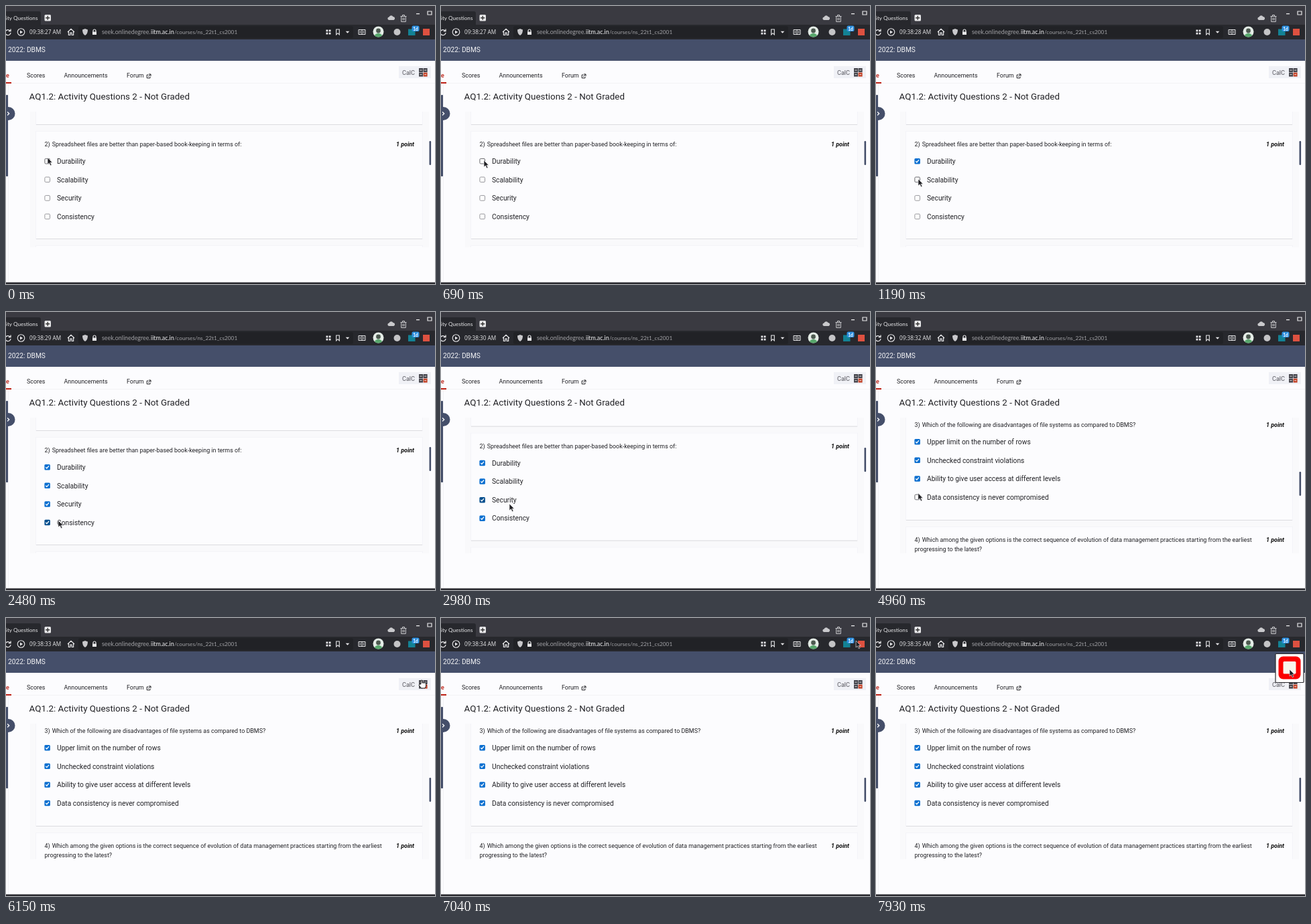
These frames come from a looping animation (640x416 px, 8 s). An HTML page with a canvas:

```html
<!DOCTYPE html>
<html lang="en">
<head>
<meta charset="utf-8">
<title>Activity questions</title>
<style>
html, body { margin: 0; width: 100%; height: 100%; overflow: hidden; background: #fcfcfe; }
canvas { display: block; }
</style>
</head>
<body>
<canvas id="stage" width="640" height="416"></canvas>
<script>
const c = document.getElementById('stage').getContext('2d');
const LOOP = 8000, INK = '#222226', LIGHT = '#e8e8ea', PAGE = '#fcfcfe';
const SLATE = '#454f6a', BLUE = '#0b6fd0';
const UI = 'Lato, sans-serif', WEB = 'Roboto, sans-serif';

// time, x, y of the pointer tip
const path = [
  [0, 62, 227], [450, 62, 227], [650, 64, 231], [920, 64, 231], [1150, 63, 259],
  [1350, 63, 259], [1550, 63, 287], [1750, 63, 287], [1950, 63, 314], [2150, 63, 314],
  [2430, 78, 312], [2500, 78, 312], [2670, 98, 287], [2780, 102, 287], [3250, 102, 287],
  [3600, 63, 199], [3900, 63, 199], [4080, 62, 222], [4300, 62, 222], [4560, 62, 249],
  [4800, 62, 249], [5020, 63, 276], [5350, 63, 276], [5560, 80, 262], [6100, 622, 95],
  [6480, 622, 95], [6850, 619, 34], [7660, 619, 34], [7920, 617, 77], [LOOP, 617, 77]
];

const questions = [
  { top: 188, height: 160,
    lines: ['Spreadsheet files are better than paper-based book-keeping in terms of:'],
    options: ['Durability', 'Scalability', 'Security', 'Consistency'],
    checks: [880, 1280, 1700, 2100] },
  { top: 359, height: 161,
    lines: ['Which of the following are disadvantages of file systems as compared to DBMS?'],
    options: ['Upper limit on the number of rows', 'Unchecked constraint violations',
      'Ability to give user access at different levels', 'Data consistency is never compromised'],
    checks: [3680, 4200, 4680, 5150] },
  { top: 531, height: 160,
    lines: ['Which among the given options is the correct sequence of evolution of data management practices starting from the earliest',
      'progressing to the latest?'],
    options: [], checks: [] }
];

const ease = (t, a, b) => {
  const k = Math.min(1, Math.max(0, (t - a) / (b - a)));
  return k * k * (3 - 2 * k);
};

function pointer(t) {
  const i = path.findIndex(p => p[0] > t);
  const [t0, x0, y0] = path[i - 1], [t1, x1, y1] = path[i];
  const k = ease(t, t0, t1);
  return { x: x0 + (x1 - x0) * k, y: y0 + (y1 - y0) * k };
}

function text(s, x, y, size, color = INK, font = WEB, style = '') {
  c.font = `${style} ${size}px ${font}`;
  c.fillStyle = color;
  c.fillText(s, x, y);
}
function rect(x, y, w, h, color) {
  c.fillStyle = color;
  c.fillRect(x, y, w, h);
}
function round(x, y, w, h, r, fill, stroke) {
  c.beginPath();
  c.roundRect(x, y, w, h, r);
  paint(fill, stroke);
}
function disc(x, y, r, fill, stroke) {
  c.beginPath();
  c.arc(x, y, r, 0, 7);
  paint(fill, stroke);
}
function paint(fill, stroke) {
  if (fill) { c.fillStyle = fill; c.fill(); }
  if (stroke) { c.strokeStyle = stroke; c.stroke(); }
}
function shape(d, x, y, fill, stroke, width = 1) {
  c.save();
  c.translate(x, y);
  c.lineWidth = width;
  const p = new Path2D(d);
  if (fill) { c.fillStyle = fill; c.fill(p); }
  if (stroke) { c.strokeStyle = stroke; c.stroke(p); }
  c.restore();
}

function browser(t) {
  rect(0, 0, 640, 28, '#3a3a41');
  rect(0, 28, 640, 22, '#27282d');
  round(-6, 8, 58, 22, 3, '#27282d');
  round(108, 30, 410, 18, 3, '#212226');
  text('ity Questions', 0, 21, 8.1, LIGHT, UI);
  round(57.5, 13, 9.5, 9.5, 1.5, LIGHT);
  shape('M-3 0H3M0 -3V3', 62.2, 17.8, null, '#333', 1.4);

  // window buttons
  shape('M-4 3.5a2.3 2.3 0 0 1 .5-4.5a3.2 3.2 0 0 1 6-.5a2.6 2.6 0 0 1 1 5Z', 575, 17.5, '#c9c9cc');
  shape('M-4.5 -3H4.5M-1.5 -3V-5H1.5V-3M-3.3 -3V5H3.3V-3M-1 -1V3M1 -1V3', 593, 18.5, null, '#c9c9cc');
  rect(612, 11, 5, 1.3, LIGHT);
  shape('M-3 -2.5H3V2.5H-3Z', 632, 10.5, null, LIGHT, 1.2);

  // toolbar
  shape('M3 -2A4 4 0 1 0 4 1M4 -4.5V-1.3H.8', 3, 39, null, LIGHT, 1.3);
  c.lineWidth = 1.1;
  disc(22.5, 39, 5.3, null, LIGHT);
  shape('M-1.5 -2.6L2.6 0L-1.5 2.6Z', 22.5, 39, LIGHT);
  const second = 27 + Math.floor((t + 260) / 1000);
  text(`09:38:${second} AM`, 35, 42, 8.2, LIGHT, '"Open Sans", sans-serif');
  shape('M-5 0L0 -4.7L5 0M-3.6 -1V4.5H-1.2V1.2H1.2V4.5H3.6V-1', 97, 39, null, LIGHT, 1.2);
  shape('M0 -5L4 -3.6C4 1 2.5 3.7 0 5C-2.5 3.7 -4 1 -4 -3.6Z', 118, 39, '#c9c9cc');
  shape('M-3 -.5H3V4H-3Z', 132, 39, LIGHT);
  shape('M-2 0V-2a2 2 0 0 1 4 0V0', 132, 39, null, LIGHT, 1.2);
  text('seek.onlinedegree.', 143, 42, 8.9, '#a2a2a6', UI);
  text('iitm.ac.in', 216, 42, 8.9, '#f4f4f6', UI);
  text('/courses/ns_22t1_cs2001', 251, 42, 8.25, '#a2a2a6', UI);
  for (const [x, y] of [[477.5, 35.5], [481.7, 35.5], [477.5, 39.7], [481.7, 39.7]])
    rect(x, y, 2.8, 2.8, LIGHT);
  shape('M-2.3 -4H2.3V4L0 1.7L-2.3 4Z', 495, 39, null, LIGHT, 1.1);
  shape('M-2.8 -1.3H2.8L0 1.8Z', 509.5, 39, LIGHT);
  shape('M-5 -3.5H5V3.5H-5ZM0 -3.5V3.5M-3.5 -1H-1.5M-3.5 1H-1.5M1.5 -1H3.5M1.5 1H3.5', 531, 39, null, LIGHT);

  // avatar silhouette
  c.save();
  disc(555.5, 38.5, 8, '#e4ece6');
  c.clip();
  disc(555.5, 37, 3.4, '#4d5a50');
  disc(555.5, 47, 6.3, '#58a86c');
  c.restore();

  disc(583.5, 39, 5, '#c4c4c6');
  rect(600, 34.5, 10.5, 9.5, '#138294');
  round(605.5, 29.5, 11, 8.5, 2, '#2c8fe0');
  text('1d', 607.2, 36.5, 6.5, '#fff', UI, 'bold');
  rect(622, 34, 10, 10, '#dd5140');
}

function header() {
  rect(0, 50, 640, 32, SLATE);
  text('2022: DBMS', 3, 69, 10.2, '#f4f4f6');
  rect(0, 115, 640, 1, '#f3f3f5');
  text('e', 0, 107, 8.93, '#bd2014', WEB, '500');
  rect(0, 114, 8, 2, '#bd2014');
  text('Scores', 31, 107, 8.93);
  text('Announcements', 86.5, 107, 8.93);
  text('Forum', 180, 107, 8.93);
  shape('M-.5 -2H-2.8V2.8H2V.7M0 -3H3V0M3 -3L-.7 .7', 213, 105, null, INK);

  rect(586, 90, 48, 18, '#f0f1f6');
  text('CalC', 591, 102.5, 9.1, '#55555c');
  for (let i = 0; i < 4; i++) {
    const x = 616 + i % 2 * 6.6, y = 93 + (i >> 1) * 6.6;
    rect(x, y, 6, 6, i == 3 ? '#c34227' : '#45454c');
    rect(x + 1.5, y + 2.6, 3, .9, '#eee');
  }
  text('AQ1.2: Activity Questions 2 - Not Graded', 34.6, 140, 13.4);
}

function checkbox(y, on, hover) {
  c.lineWidth = 1;
  if (!on) return round(57.9, y - 3.8, 7.6, 7.6, 1.5, '#fff', hover ? '#66666c' : '#97979c');
  round(57.4, y - 4.2, 8.5, 8.5, 1.5, hover ? '#07508f' : BLUE);
  shape('M-2.3 0L-.7 1.8L2.4 -2', 61.6, y, null, '#fff', 1.3);
}

function card(top, height) {
  rect(44, top - 1, 578, height + 2, '#f4f4f8');
  rect(45, top, 576, height, PAGE);
  rect(45, top + height, 576, 1, '#dcdce0');
}

function quiz(t, tip) {
  const scroll = 209 * ease(t, 2930, 3420);
  c.save();
  c.beginPath();
  c.rect(36, 158, 595, 203);
  c.clip();
  rect(36, 158, 595, 203, '#f9f9fb');
  card(17 - scroll, 160);
  questions.forEach((q, n) => {
    const top = q.top - scroll;
    card(top, q.height);
    text(`${n + 2})`, 57.5, top + 22, 8.93);
    q.lines.forEach((s, i) => text(s, i ? 57.5 : 68.7, top + 22 + i * 14, 8.93));
    text('1 point', 582, top + 22, 8.93, '#111', WEB, 'italic bold');
    q.options.forEach((s, i) => {
      const y = top + 44.2 + i * 27.6;
      const hover = tip.x < 140 && Math.abs(tip.y - y) < 8;
      checkbox(y, t >= q.checks[i], hover);
      text(s, 76, y + 3.7, 10.25);
    });
  });
  c.restore();
  round(631.5, 202 + 37 * scroll / 209, 2.6, 36, 1.2, SLATE);
}

function sidebar() {
  rect(3, 116, 1, 297, '#f1f1f5');
  round(0, 133, 3, 122, 1, SLATE);
  disc(3.5, 161, 10, SLATE);
  shape('M-1.4 -2.5L1.2 0L-1.4 2.5', 3.5, 161, null, '#fff', 1.3);
  rect(0, 413.5, 640, 2.5, '#2b2b30');
}

function popup() {
  c.lineWidth = 1.2;
  round(596, 53.5, 42, 43, 1, '#fff', '#29292e');
  round(600.5, 57.5, 33, 34, 7, '#fb0000');
  round(607.5, 65, 19, 18.5, 1.5, '#f8f6ec');
}

function drawPointer({ x, y }, hand) {
  if (hand)
    shape('M-3 1V-4a1 1 0 0 1 2 0V-1H4.5V4L3 7H-2.5L-6 2.5L-5 1Z', x, y + 3, '#fff', '#222');
  else
    shape('M0 0V10L2.4 7.8L4.2 11.8L6 11L4.2 7.2H7.2Z', x, y, '#202024', '#f8f8fa', .6);
}

function draw(now) {
  const t = now % LOOP, tip = pointer(t);
  rect(0, 0, 640, 416, PAGE);
  browser(t);
  header();
  quiz(t, tip);
  sidebar();
  if (t >= 7150) popup();
  drawPointer(tip, t > 6040 && t < 6560);
}

const start = performance.now();
function frame() {
  draw(performance.now() - start);
  requestAnimationFrame(frame);
}
frame();
</script>
</body>
</html>
```
